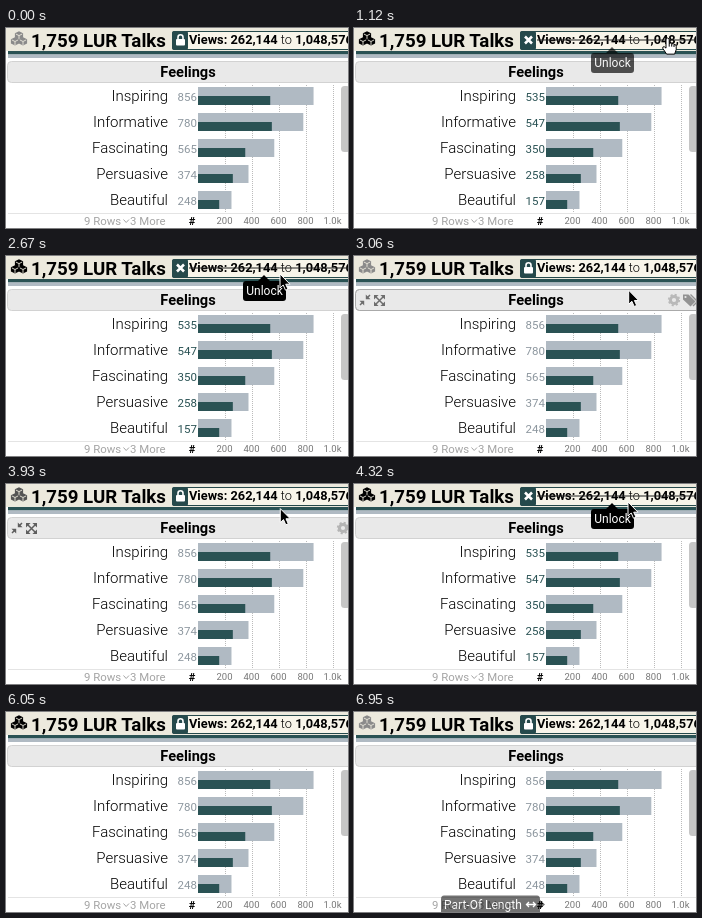
These frames come from a looping animation (342 px wide and 200 px high, 7.01 s). An HTML page:

```html
<!DOCTYPE html>
<html lang="en">
<head>
<meta charset="utf-8">
<title>Talk feelings</title>
<style>
  html, body { margin: 0; width: 100%; height: 100%; overflow: hidden; background: #fff; }
  svg { display: block; width: 342px; height: 200px; font-family: Roboto, sans-serif; }
  .end { text-anchor: end; }
  .mid { text-anchor: middle; }
  .bold { font-weight: 700; }
  .light { font-weight: 300; }
  .soft { fill: #a4a4a4; }
</style>
</head>
<body>
<svg id="stage" viewBox="0 0 342 200">
  <defs>
    <g id="cube">
      <path d="M0-4.2L4.1-2.2V2.2L0 4.2L-4.1 2.2V-2.2Z"/>
      <path d="M-3.2-1.5L0 .1L3.2-1.5M0 .1V3.6" fill="none" stroke="#ece9dd" stroke-width=".9"/>
    </g>
    <path id="head" d="M5.5-5.5V-.9L.9-5.5Z"/>
  </defs>

  <!-- title bar -->
  <rect width="342" height="23" fill="#ece9dd"/>
  <g id="cubes">
    <use href="#cube" x="13" y="7.5"/>
    <use href="#cube" x="9" y="13.4"/>
    <use href="#cube" x="17" y="13.4"/>
  </g>
  <text class="bold" x="25" y="18.5" font-size="18.7">1,759 LUR Talks</text>
  <rect x="166.5" y="3.5" width="190" height="18" rx="2" fill="#f8f5ea" stroke="#25494b"/>
  <rect x="166" y="3" width="16" height="19" rx="2" fill="#25494b"/>
  <g id="lock">
    <rect x="170" y="11" width="9" height="6.5" rx="1" fill="#fff"/>
    <path d="M172 11.5V9.3a2.5 2.5 0 0 1 5 0V11.5" fill="none" stroke="#fff" stroke-width="1.6"/>
  </g>
  <path id="cross" d="M171 8.5L178 15.5M178 8.5L171 15.5" stroke="#fff" stroke-width="2.6"/>
  <text class="bold" x="183" y="16" font-size="12.8">Views: 262,144 <tspan class="light">to</tspan> 1,048,576</text>
  <path id="strike" d="M183 12H342" stroke="#222" stroke-width="1.1"/>
  <rect x="2" y="23" width="340" height="3.5" fill="#2a5254"/>
  <rect x="2" y="26.5" width="340" height="3.5" fill="#b0bac3"/>

  <!-- summary header -->
  <rect x="1.5" y="33.5" width="361" height="21" rx="4" fill="#e9e9e9" stroke="#d2d2d2"/>
  <rect id="glow" x="1.5" y="33.5" width="361" height="21" rx="4" fill="none" stroke="#aaa"/>
  <text class="mid bold" x="182" y="49" font-size="14.6">Feelings</text>
  <g id="tools">
    <g fill="#444" stroke="#444" stroke-width="1.5">
      <path d="M6 49L9 46M16 39L13 42"/>
      <path d="M5.5 44.8H10.2V49.5ZM11.8 38.5V43.2H16.5Z" stroke="none"/>
      <path d="M22 41L29 48M29 41L22 48"/>
      <g id="corners" stroke="none"></g>
    </g>
    <g id="right" fill="none">
      <circle cx="320" cy="44" r="3.6" stroke="#aaa" stroke-width="3"/>
      <circle cx="320" cy="44" r="5.3" stroke="#aaa" stroke-width="1.8" stroke-dasharray="2.1 2.06"/>
      <path d="M329 38.5H334.5L341.5 45.5L336.5 50.5L329 43.5Z" fill="#777"/>
      <path d="M336.5 38.5L343.5 45.5L339 50" stroke="#777" stroke-width="1.4"/>
      <circle cx="331.5" cy="41" r="1.1" fill="#e9e9e9"/>
    </g>
  </g>

  <!-- chart -->
  <g id="grid" stroke="#bbb" stroke-dasharray="1 1"></g>
  <g id="rows"></g>
  <path d="M2 185.5H342" stroke="#e4e4e4"/>
  <rect x="335" y="58" width="9" height="66" rx="3.5" fill="#c6c6c6"/>
  <g class="soft" font-size="11.4">
    <text x="78" y="197">9 Rows</text>
    <path d="M117.5 191.5L120.2 194.5L123 191.5" fill="none" stroke="#a4a4a4"/>
    <text x="124" y="197">3 More</text>
  </g>
  <g id="ticks" class="mid" font-size="9.5" fill="#777"></g>

  <g id="axisTip">
    <path d="M90 183.5H183Q186 183.5 186 187V188L191 192.5L186 197V200H87V187Q87 183.5 90 183.5Z"/>
    <text x="90" y="196.5" font-size="12" fill="#fff">Part-Of Length</text>
    <path d="M173 192.5H181M175 190L172.5 192.5L175 195M179 190L181.5 192.5L179 195" fill="none" stroke="#fff" stroke-width="1.3"/>
  </g>
  <text class="mid bold" x="186" y="197" font-size="11">#</text>

  <g id="unlockTip">
    <path d="M258 19L264 25H277Q280 25 280 28V42Q280 45 277 45H240Q237 45 237 42V28Q237 25 240 25H252Z"/>
    <text class="mid" x="258.5" y="39" font-size="12" fill="#fff">Unlock</text>
  </g>

  <g id="cursor">
    <path id="arrow" d="M0 0V14L3.2 11L5.5 16.2L8 15.2L5.7 10.2H10Z" stroke="#fff"/>
    <path id="hand" d="M-1.6 1.5Q0-.8 1.6 1.5V6Q3.2 4.8 4.1 6.4Q5.7 5.4 6.4 7Q8.5 6.4 8.6 8.6V12L7 16.5H-1L-5 10.5Q-5 8.5-3 9.3L-1.6 10.5ZM1.6 6V9M4.1 6.6V9M6.4 7.2V9.4" fill="#fff" stroke="#000"/>
  </g>
</svg>

<script>
const LOOP = 7010;
const STEP = 55;
const SCALE = 0.135;
const LEFT = 192;
const $ = id => document.getElementById(id);

function add(parent, tag, attrs, text) {
  const el = document.createElementNS('http://www.w3.org/2000/svg', tag);
  for (const k in attrs) el.setAttribute(k, attrs[k]);
  if (text) el.textContent = text;
  parent.append(el);
  return el;
}

for (let turn = 0; turn < 360; turn += 90)
  add($('corners'), 'use', { href: '#head', transform: `translate(25.5 44.5) rotate(${turn})` });

for (let v = 200; v <= 1000; v += 200) {
  const x = Math.round(LEFT + v * SCALE);
  add($('grid'), 'path', { d: `M${x + .5} 57V186` });
  add($('ticks'), 'text', { x: x - .5, y: 196 }, v < 1000 ? String(v) : '1.0k');
}

const rows = [
  ['Inspiring', 856, 535],
  ['Informative', 780, 547],
  ['Fascinating', 565, 350],
  ['Persuasive', 374, 258],
  ['Beautiful', 248, 157],
].map(([name, all, part], i) => {
  const y = 59 + 26 * i, g = $('rows');
  add(g, 'text', { class: 'end light', x: 162, y: y + 14, 'font-size': 15 }, name);
  add(g, 'rect', { x: LEFT, y, width: all * SCALE, height: 18, fill: '#b0bac3' });
  add(g, 'rect', { x: LEFT, y: y + 9, width: part * SCALE, height: 9, fill: '#2a5254' });
  const label = add(g, 'text', { class: 'end', x: 191, y: y + 13.7, 'font-size': 11.5 });
  return { label, all, part };
});

const clamp = p => Math.min(1, Math.max(0, p));
const linear = p => p;
const smooth = p => p * p * (3 - 2 * p);
const settle = p => 1 - (1 - p) ** 2.5;

// Pointer trips; it rests at the end of each one
const trips = [
  { start: 1000, end: 1590, from: [339, 6], to: [276, 15], ease: settle },
  { start: 2670, end: 3290, from: [274, 18], to: [275, 42], ease: smooth },
  { start: 3640, end: 4320, from: [275, 42], to: [274, 18], ease: settle },
  { start: 4380, end: 4380, from: [276, 15], to: [276, 15], ease: linear },
  { start: 5630, end: 6050, from: [277, 15], to: [362, 6], ease: smooth },
  { start: 6580, end: 6950, from: [340, 27], to: [180, 215], ease: linear },
];

// When the pointer is over each part
const over = {
  title: [[650, 2780], [3880, 6600]],
  views: [[1000, 2780], [4030, 5850]],
  summary: [[2890, 3880], [6640, 6720]],
  link: [[1000, 2670], [4380, 5900]],
};

const ramp = (t, start, ms) => clamp((t - start) / ms);
const within = (t, spans) => spans.some(([a, b]) => t >= a && t < b);
const fade = (t, spans, ms) =>
  spans.reduce((sum, [a, b]) => sum + ramp(t, a, ms) - ramp(t, b, ms), 0);
const show = (id, on) => $(id).setAttribute('opacity', Number(on));
const move = (id, x, y) => $(id).setAttribute('transform', `translate(${x} ${y})`);

function pointer(t) {
  const trip = trips.findLast(s => t >= s.start) || trips[trips.length - 1];
  const { start, end, from, to, ease } = trip;
  const p = t < start ? 1 : ease(ramp(t, start, end - start || 1));
  return from.map((v, i) => v + (to[i] - v) * p);
}

// The picture advances in short steps while the pointer travels
function snap(t) {
  const trip = trips.find(s => t >= s.start && t < s.end);
  return trip ? t - (t - trip.start) % STEP : t;
}

function draw(t) {
  const hover = within(t, over.views);
  const hand = within(t, over.link);
  const grey = Math.round(138 * (1 - fade(t, over.title, 90)));

  $('cubes').setAttribute('fill', `rgb(${grey},${grey},${grey})`);
  show('lock', !hover);
  show('cross', hover);
  show('strike', hover);
  for (const r of rows) {
    r.label.textContent = hover ? r.part : r.all;
    r.label.setAttribute('fill', hover ? '#2a5254' : '#8d979f');
  }
  show('unlockTip', fade(t, over.views, 165));
  show('axisTip', .55 * ramp(t, 6800, 150));
  show('tools', fade(t, over.summary, 220));
  show('glow', within(t, over.summary));
  move('right', 17 * ramp(t, 3640, 220), 0);
  show('hand', hand);
  show('arrow', !hand);
  move('cursor', ...pointer(t));
}

const start = performance.now();
function frame() {
  draw(snap((performance.now() - start) % LOOP));
  requestAnimationFrame(frame);
}
frame();
</script>
</body>
</html>
```
